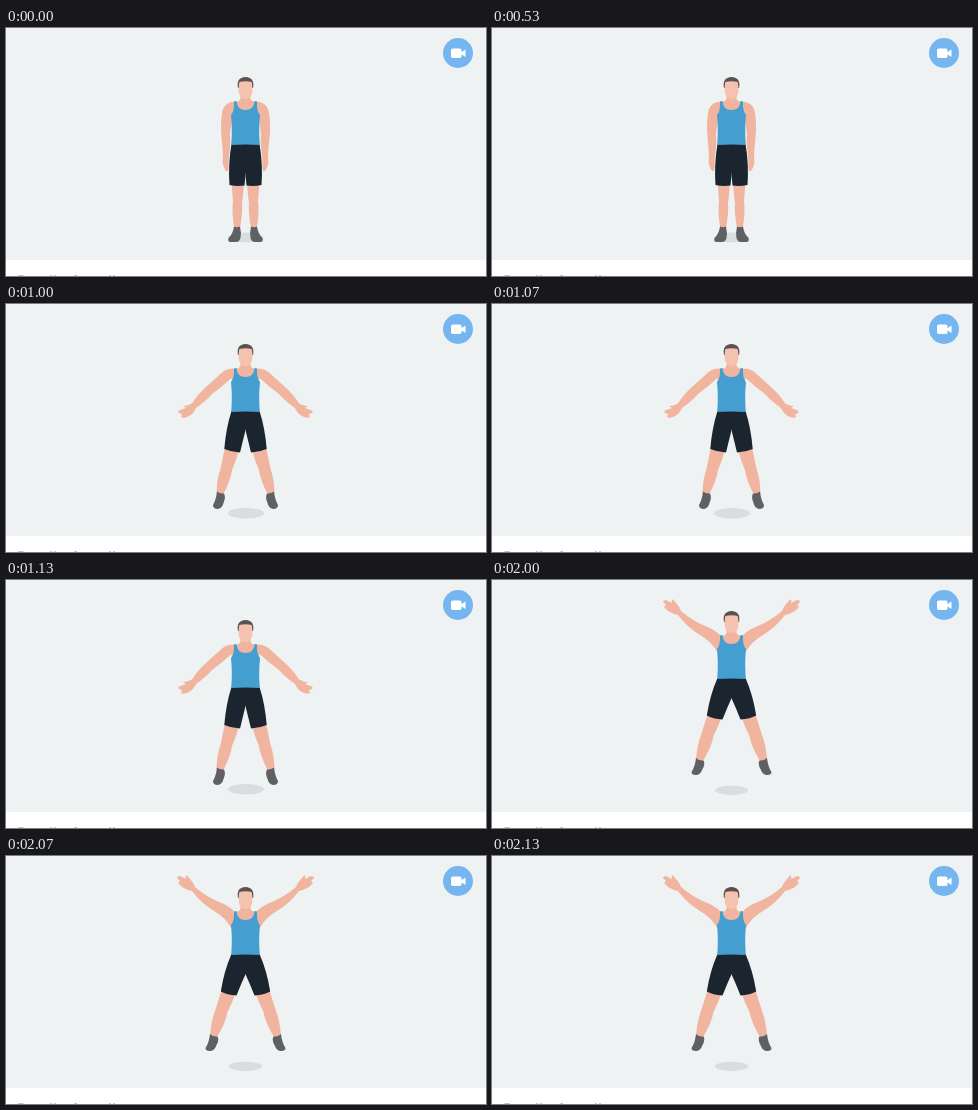
These frames come from a looping animation (480 by 248 pixels, 2.99 s). An HTML page:

```html
<!DOCTYPE html>
<html lang="en">
<head>
<meta charset="utf-8">
<title>Jump exercise</title>
<style>
  html, body { margin: 0; width: 100%; height: 100%; overflow: hidden; background: #fff; }
  svg { display: block; width: 480px; height: 248px; }
  .skin { fill: #f1b49e; }
  .face { fill: #f6c2b0; }
  .hair { fill: #5b5150; }
  .shirt { fill: #449fd0; }
  .shorts { fill: #1a252f; }
  .shoe { fill: #5e6064; }
  .shadow { fill: #d9dce1; }
  text { font: 18px "Liberation Sans", Arial, sans-serif; fill: #bbb; }
</style>
</head>
<body>
<svg viewBox="0 0 480 248">
  <defs>
    <g id="torso">
      <path class="skin" d="M234.500 64V71Q233 73.500 228 74.500L224.500 80L227 90H252L254.500 80L251 74.500Q246 73.500 244.500 71V64Z"/>
      <path class="hair" d="M232 60Q230 49.500 239.500 49Q249 49.500 247 60Z"/>
      <path class="face" d="M232.600 59L233.300 54Q239.500 52.500 245.700 54L246.400 59L246.200 65Q244.500 71 239.500 71T232.800 65Z"/>
      <path class="shirt" d="M228 73.500L230.500 73Q231 82 239.500 82T248.500 73L251 73.500Q250.500 83 254 87Q252.500 101 253.800 117Q239.500 116 225.200 117Q226.500 101 225 87Q228.500 83 228 73.500Z"/>
    </g>
  </defs>
  <rect width="480" height="232" fill="#eef2f3"/>
  <text x="8" y="260.400">Cardio for all</text>
  <circle cx="452" cy="25" r="15" fill="#76b6f0"/>
  <rect x="445" y="20.500" width="10.500" height="9.500" rx="1.800" fill="#fff"/>
  <path d="M455 24.500L459.500 21.500V29L455 26Z" fill="#fff"/>
  <g id="stage"></g>
</svg>
<script>
const LOOP = 2990;

// Left half of each pose; the right half is its mirror image.
const poses = [
  {
    start: 0, lift: 0, shadow: [240, 209.5, 17, 5],
    arm: "M229 73.500Q219 74 216.500 82Q214.500 92 215 103L217 127Q216 134 217.500 138Q219 143 221.500 143.500Q223.500 141 222.500 136L223 127Q225 115 224 106L226.500 88Z",
    leg: "M225.500 154L238 154Q237.500 165 236 175Q237 184 233.800 201H228.500Q225.500 185 227 173Z",
    shorts: "M225.500 116H240.500V136L238.500 157.500Q231 158.500 223.500 157Q222 136 225.500 116Z",
    shoe: "M228 198.500Q231 200 234 198.500Q235.500 205 234.500 210Q233.500 214 230 214H224Q221.500 213.500 222.500 210Q227 206 228 198.500Z"
  },
  {
    start: 1000, lift: -9, shadow: [240, 209.3, 18, 5.2],
    arm: "M229 64.500Q221 64 216 68.500L200 83Q191 91 186 99.500Q181 102 177 102L180 104L173 106.500Q171.500 108 173 109L176 110L175 113Q178 115 183 112Q188 109 190 104Q200 97 206 90Q217 82 226 73.500Z",
    leg: "M219 143L233 146Q230 157 226 166Q225 175 217 191L210.500 189Q211 174 214.500 165Z",
    shorts: "M225.500 107H240.500V122L234 148.500Q225 148 218.300 145Q220 124 225.500 107Z",
    shoe: "M211 187.500Q214 190 218 189.500Q220 193 217.500 199Q216.500 204 212 205Q207 205 207 201Q210 196 211 187.500Z"
  },
  {
    start: 2000, lift: -18, shadow: [239.5, 210.3, 16.5, 4.6],
    arm: "M229 56Q222 49 213 46Q201 41 189 31Q187 26 184 23L181 19.500Q179 19 180 23L174 20Q171 20 171 22L174 25L172 27L176 31Q181 34 186 35Q195 47 208 55Q219 61 226 73L230 64Z",
    leg: "M216 133L230 136Q226 147 221.500 156Q220 166 210.500 182L204 180Q205 165 209 155Z",
    shorts: "M225.500 98H240.500V116Q235 128 230.500 139.500Q221 139 214.800 135.500Q218 115 225.500 98Z",
    shoe: "M204 178Q207 181 211.500 180.500Q213.500 184 210.500 189Q209 194 205 195Q199.500 195.500 199.500 192Q203 187 204 178Z"
  }
];

function draw(pose, i) {
  const [cx, cy, rx, ry] = pose.shadow;
  const half = ["leg", "shoe", "shorts", "arm"].map(part => {
    const look = part === "arm" || part === "leg" ? "skin" : part;
    return `<path class="${look}" d="${pose[part]}"/>`;
  }).join("");
  return `<g class="pose">
    <ellipse class="shadow" cx="${cx}" cy="${cy}" rx="${rx}" ry="${ry}"/>
    <g id="half${i}">${half}</g>
    <use href="#half${i}" transform="matrix(-1 0 0 1 479 0)"/>
    <use href="#torso" y="${pose.lift}"/>
  </g>`;
}

const stage = document.getElementById("stage");
stage.innerHTML = poses.map(draw).join("");
const groups = [...stage.querySelectorAll(".pose")];
const origin = performance.now();

function show(now) {
  const t = Math.max(0, now - origin) % LOOP;
  const active = poses.filter(p => p.start <= t).length - 1;
  groups.forEach((g, i) => g.setAttribute("visibility", i === active ? "visible" : "hidden"));
}

function tick() {
  show(performance.now());
  requestAnimationFrame(tick);
}
tick();
</script>
</body>
</html>
```
